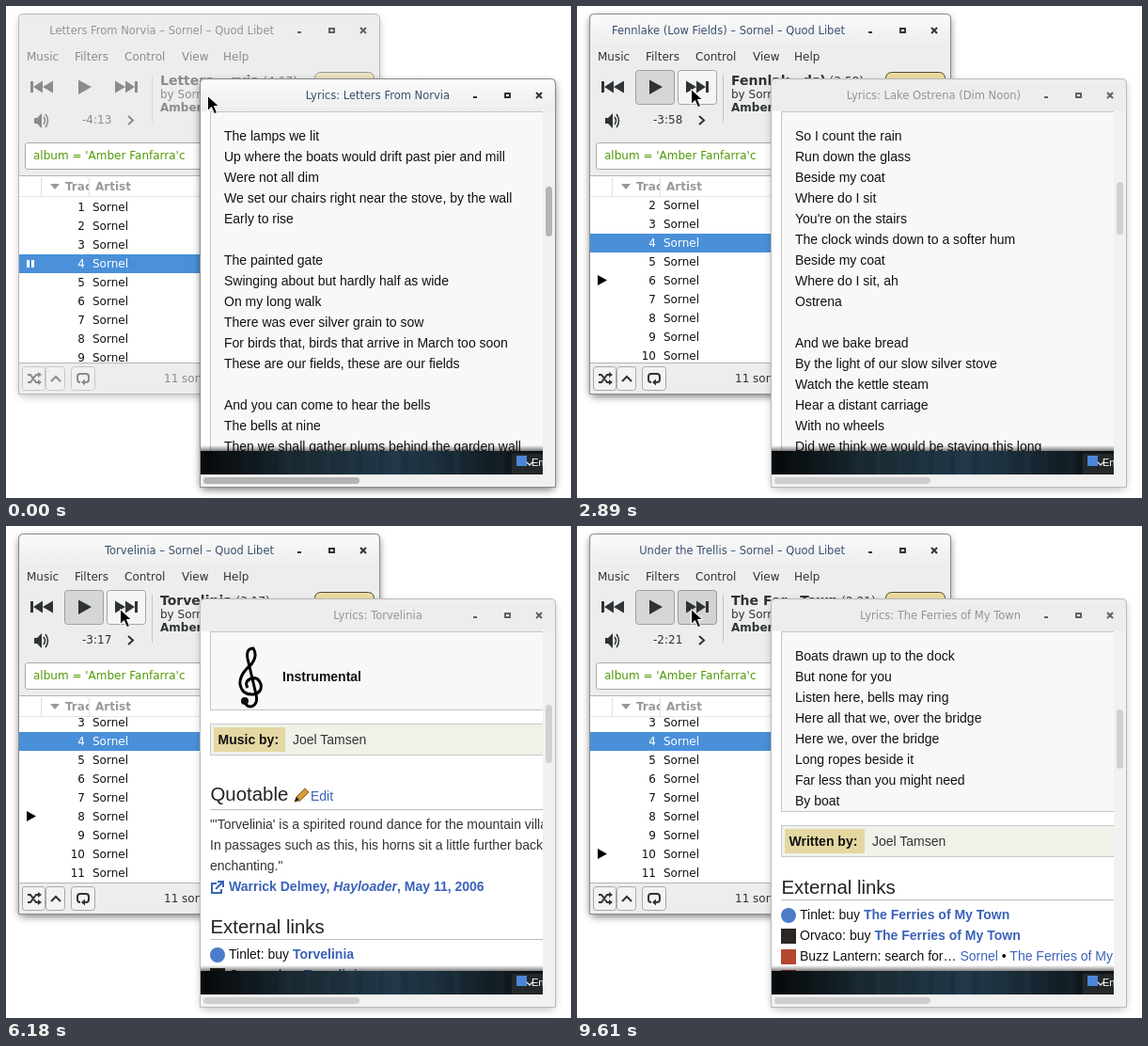
An HTML page that plays this animation: 601 by 523 pixels, repeating every 9.71 s.

```html
<!DOCTYPE html>
<html lang="en">
<head>
<meta charset="utf-8">
<title>Lyrics window</title>
<style>
  html, body { margin: 0; width: 100%; height: 100%; overflow: hidden; background: #fff; }
  svg { display: block; width: 601px; height: 523px; }
  text { white-space: pre; }
  .ui { font: 12px "DejaVu Sans", sans-serif; fill: #2e3436; }
  .page { font: 14px "Liberation Sans", Arial, sans-serif; fill: #111; }
  .title { font-size: 11.5px; }
  .b { font-weight: bold; }
  .big { font-size: 14px; font-weight: bold; }
  .link { fill: #3a62b8; }
  .head { font-size: 20.4px; fill: #222; }
  .small { font-size: 12px; }
</style>
</head>
<body>
<svg id="stage" viewBox="0 0 601 523"></svg>
<script>
const LOOP = 9710;
const ARTIST = 'Sornel', ALBUM = 'Amber Fanfarra', WRITER = 'Joel Tamsen';

// at: press, window title, player, lyrics title, page, end of the bar slide
const SONGS = [
  { name: 'Letters From Norvia', short: 'Letters …rvia', len: '4:17', left: '4:13', scroll: 0, thumb: [192, 245],
    at: [0, 0, 0, 0, 0, 0],
    lines: ['The lamps we lit', 'Up where the boats would drift past pier and mill', 'Were not all dim',
      'We set our chairs right near the stove, by the wall', 'Early to rise', '', 'The painted gate',
      'Swinging about but hardly half as wide', 'On my long walk', 'There was ever silver grain to sow',
      'For birds that, birds that arrive in March too soon', 'These are our fields, these are our fields', '',
      'And you can come to hear the bells', 'The bells at nine', 'Then we shall gather plums behind the garden wall', ''] },
  { name: 'Lake Ostrena (Dim Noon)', short: 'Lake Os…on)', len: '3:15', scroll: 2, thumb: [187, 243],
    at: [1330, 1410, 1450, 1490, 1870, 2310], slide: [[150, 490], [110, 481], [70, 477]], app: 'Quod Li…',
    lines: ['So I count the rain', 'Run down the glass', 'Beside my coat', 'Where do I sit', "You're on the stairs",
      'The clock winds down to a softer hum', 'Beside my coat', 'Where do I sit, ah', 'Ostrena', '',
      'And we bake bread', 'By the light of our slow silver stove', 'Watch the kettle steam',
      'Hear a distant carriage', 'With no wheels', 'Did we think we would be staying this long', ''] },
  { name: 'Fennlake (Low Fields)', short: 'Fennlak…ds)', len: '3:58', scroll: 22, thumb: [198, 263],
    at: [2570, 2680, 2860, 3060, 3210, 3500], slide: [[150, 493], [110, 484]],
    lines: ['Calm, calm is all there on the moor', 'Yes, and I stay, and I stay', 'I could find my own way home',
      "Yes and there's my own way, way home"] },
  { name: 'Cobalt Acres', len: '2:08', scroll: 42, thumb: [192, 253], early: [4390, 198, 272],
    at: [3930, 4000, 4060, 4130, 4540, 4820], slide: [[140, 493], [100, 483]],
    lines: ["The kettle's on", "The kettle's off", 'When morning comes too soon', 'I curl up like a sleepy cat',
      'Counting the tiles along the roof', '', 'When I wake up', 'I plan to build a little boat',
      'A cobalt field, where the bees are at ease', 'Hum along now, hum along'] },
  { name: 'Torvelinia', len: '3:17', scroll: 45, thumb: [190, 252], early: [5790, 192, 270],
    at: [5260, 5350, 5440, 5530, 5930, 6180], slide: [[140, 493], [100, 482]], quote: true },
  { name: 'The Quarry', len: '3:12', scroll: 45, thumb: [197, 267], bare: true,
    at: [6670, 6750, 6810, 6870, 7230, 7640], slide: [[150, 493], [110, 483], [60, 477]] },
  { name: 'The Ferries of My Town', short: 'The Fer…Town', len: '2:21', scroll: 45, thumb: [195, 258],
    at: [8020, 8090, 8170, 8350, 8590, 9000], slide: [[150, 492], [110, 483], [60, 477]],
    lines: ['Boats drawn up to the dock', 'But none for you', 'Listen here, bells may ring',
      'Here all that we, over the bridge', 'Here we, over the bridge', 'Long ropes beside it',
      'Far less than you might need', 'By boat'] },
  { name: 'Under the Trellis', at: [9480, 9610, 1e5, 1e5, 1e5, 1e5] }
];

// name, colour, round mark, kind of link
const SITES = [
  ['Tinlet', '#4a7cc9', 1, 'buy'], ['Orvaco', '#2b2722', 0, 'buy'], ['Buzz Lantern', '#b5482f', 0, 'find'],
  ['Noma.xy', '#c5362c', 0, 'album'], ['Calinda', '#7fb0dc', 0, 'find'], ['Omniledge', '#444', 0, 'album'],
  ['Wavelia', '#6b7a24', 1, ''], ['onlysong', '#3d8fd0', 1, ''], ['TuneLedgers', '#1c2350', 0, '']
];

const rect = (x, y, w, h, fill, more = '') =>
  `<rect x="${x}" y="${y}" width="${w}" height="${h}" fill="${fill}" ${more}/>`;
const box = (x, y, w, h, fill, line, r = 0) =>
  rect(x + .5, y + .5, w - 1, h - 1, fill, `stroke="${line}" rx="${r}"`);
const path = (d, fill = '#2e3436', more = '') => `<path d="${d}" fill="${fill}" ${more}/>`;
const line = (d, width = 2, color = '#2e3436') => path(d, 'none', `stroke="${color}" stroke-width="${width}"`);
const text = (x, y, s, cls = '', more = '') => `<text x="${x}" y="${y}" class="${cls}" ${more}>${s}</text>`;
const span = (s, cls) => `<tspan class="${cls}">${s}</tspan>`;

const heading = (y, s, gap = 6) =>
  text(217.5, y, s, 'head') + rect(217, y + gap, 354, 1, '#bbb');

function links(song, y) {
  const join = list => list.map(s => span(s, 'link')).join(' • ');
  return SITES.map(([site, color, round, kind], i) => {
    const by = y + 22 * i;
    if (song.bare && (kind === 'album' || site === 'Orvaco')) kind = 'find';
    const names = kind === 'album' ? [ARTIST, ALBUM, song.name] : [ARTIST, song.name];
    const body = kind === 'find' || kind === 'album'
      ? 'search for… ' + join(names)
      : (kind && kind + ' ') + span(song.name, 'b link');
    return rect(217, by - 12, 16, 16, color, round ? 'rx="8"' : '') + text(237, by, `${site}: ${body}`);
  }).join('');
}

function credit(y, label, w) {
  return box(217, y, 400, 34, '#f0f2ea', '#c9c9c9') + rect(221, y + 4, w, 26, '#e4d8a2') +
    text(225.5, y + 22, label, 'b') + text(221 + w + 8, y + 22, WRITER, '', 'fill="#333"');
}

const CLEF = 'M254 188q4 6 9 3q5-3 3-12L257 141q-2-11 6-11q5 8-2 17q-13 11-12 21q2 12 14 11q10-2 8-11q-3-8-10-6q-8 3-4 10';

function page(song) {
  const n = song.lines ? song.lines.length : 0;
  const end = n ? 128 + 22 * n : 196;
  let s = box(217, 112, 400, end - 112, '#f8f8f8', '#c4c4c4');
  if (n) s += song.lines.map((l, i) => text(232, 143 + 22 * i, l)).join('');
  else s += line(CLEF, 3, '#000') + '<circle cx="254" cy="186" r="4"/>' + text(294, 165, 'Instrumental', 'b');
  if (!song.bare) s += credit(end + 14, n ? 'Written by:' : 'Music by:', n ? 85 : 76);
  let y = end + (song.bare ? 39 : 87);
  if (song.quote) {
    s += heading(292, 'Quotable', 9) +
      path('M307 293l2-5 9-9 4 4-9 9z', '#d99a3c', 'stroke="#6b4a1c" stroke-width=".8"') +
      path('M307 293l2-5 3 3z', '#222') + text(324, 292, 'Edit', 'link') +
      ['"\'' + song.name + '\' is a spirited round dance for the mountain villages',
        'In passages such as this, his horns sit a little further back',
        'enchanting."'].map((l, i) => text(217, 322 + 22 * i, l, '', 'fill="#333"')).join('') +
      line('M224 380h-5v10h10v-4', 2, '#3a62b8') + line('M223 386l7-7M225 378h6v6', 2, '#3a62b8') +
      text(237, 388, 'Warrick Delmey, <tspan font-style="italic">Hayloader</tspan>, May 11, 2006', 'b link');
    y = 433;
  }
  s += heading(y, 'External links') + links(song, y + 27);
  if (song.bare) s += box(217, 454, 400, 60, '#fff', '#bbb') +
    text(238, 479, 'Categories: Song | Songs by ' + ARTIST + ' | Green Songs | Songs T', 'small link');
  return s;
}

function shadow(id, x, y, w, h) {
  return rect(x, y + 3, w, h, '#000', `id="${id}" rx="5" filter="url(#soft)"`);
}

function frame(x, y, w, h, id) {
  const d = `M${x + .5} ${y + h - .5}v${6 - h}q0-5 5-5h${w - 11}q5 0 5 5v${h - 6}z`;
  return path(d, '#ededed', 'stroke="#b9b9b9"') +
    `<g id="${id}">${path(d, 'none', 'stroke="#8c8c8c"')}${rect(x + 2, y + 1, w - 4, 33, 'url(#bar)', 'rx="4"')}</g>`;
}

const controls = (x, y, id) => `<g id="${id}">` + rect(x - 2, y + 1, 4, 2, '#2e3436') +
  path(`M${x + 31} ${y - 3}h7v6h-7zm2 2v2h3v-2z`, '#2e3436', 'fill-rule="evenodd"') +
  line(`M${x + 65} ${y - 3}l6 6m0-6l-6 6`) + '</g>';

const rows = Array.from({ length: 11 }, (_, i) => {
  const y = 218 + 20 * i, color = i === 3 ? '#fff' : '#111';
  return (i === 3 ? rect(14, y - 14, 383, 20, '#4a90d9') : '') +
    text(84, y, i + 1, '', `text-anchor="end" style="fill:${color}"`) +
    text(92, y, ARTIST, '', `style="fill:${color}"`);
}).join('');

const menu = [['Music', 22], ['Filters', 73], ['Control', 126], ['View', 187], ['Help', 231]]
  .map(([s, x]) => text(x, 58, s)).join('');

const streaks = Array.from({ length: 30 }, (_, i) =>
  rect(207 + i * 11.2, 0, 5 + 4 * Math.sin(i * 5), 25, i % 2 ? '#000' : '#3a5a70',
    `opacity="${(.06 + .05 * Math.sin(i * 2.7)).toFixed(2)}"`)).join('');

const stops = ['#05080a', '#10191e', '#1a2a33', '#1d303c', '#22394a', '#1a2c38', '#121d24', '#0c1114']
  .map((c, i) => `<stop offset="${i / 7}" stop-color="${c}"/>`).join('');

const stage = document.getElementById('stage');
stage.innerHTML = `
<defs>
  <filter id="soft" x="-10%" y="-10%" width="120%" height="120%"><feGaussianBlur stdDeviation="4"/></filter>
  <linearGradient id="bar" x2="0" y2="1"><stop stop-color="#fbfbfb"/><stop offset="1" stop-color="#ededed"/></linearGradient>
  <linearGradient id="night">${stops}</linearGradient>
  <linearGradient id="fade" x2="0" y2="1"><stop stop-color="#000" stop-opacity="0"/><stop offset="1" stop-color="#000" stop-opacity=".5"/></linearGradient>
  <clipPath id="listClip"><rect x="14" y="203" width="383" height="176"/></clipPath>
  <clipPath id="trackClip"><rect x="60" y="182" width="28" height="20"/></clipPath>
  <clipPath id="pageClip"><rect x="207" y="112" width="364" height="386"/></clipPath>
</defs>
${rect(0, 0, 601, 523, '#fff')}
<g class="ui">
  ${shadow('mainShade', 14, 9, 383, 403)}
  ${frame(13, 8, 385, 405, 'mainGlow')}
  ${text(285, 30, '', 'title', 'id="mainTitle" text-anchor="end"')}
  ${controls(312, 26, 'mainCtl')}
  <g id="mainInk">
    ${menu}
    <g id="buttons">${box(62, 68, 42, 37, '#d6d6d6', '#a0a0a0', 3)}
      <g id="hover">${box(107, 68, 42, 37, '#f5f5f5', '#a4a4a4', 3)}</g>
      <g id="press">${box(107, 68, 42, 37, '#d3d3d3', '#989898', 3)}</g></g>
    ${path('M26 80h3v12h-3zM39 79.500v13l-10-6.500zM50 79.500v13l-11-6.500z')}
    ${path('M77 78.500l14 7.500-14 8z')}
    ${path('M116 79.500v13l11-6.500zM127 79.500v13l10-6.500zM137 80h3v12h-3z')}
    ${path('M30 119h3l5-5v16l-5-5h-3z')}
    ${line('M40 118q3 4 0 8M42 115q5 7 0 14', 1.5)}
    ${text(81, 125, '', '', 'id="clock"')}
    ${line('M130 117l5 4.500-5 4.500')}
    ${rect(155, 73, 1, 51, '#c4c4c4')}
    <text x="164" y="84"><tspan id="song" class="big"></tspan> <tspan id="len"></tspan></text>
    ${text(164, 98, 'by ' + ARTIST)}
    ${text(164, 112, ALBUM, 'b')}
    ${box(328, 70, 64, 40, '#ecdca0', '#4a4a3a', 6)}
  </g>
  ${box(20, 145, 370, 29, '#fff', '#a3ab9d', 3)}
  ${text(29, 163, `album = '${ALBUM}'c`, '', 'style="fill:#4e9a06"')}
  ${rect(14, 180, 383, 200, '#b4b4b4')}${rect(14, 181, 383, 198, '#fff')}
  ${rect(37, 182, 1, 20, '#e0e0e0')}${rect(88, 182, 1, 20, '#e0e0e0')}${rect(14, 202, 383, 1, '#e6e6e6')}
  ${path('M47 189h10l-5 6z', '#999')}
  ${text(63, 196, 'Track', 'b', 'style="fill:#999" clip-path="url(#trackClip)"')}
  ${text(95, 196, 'Artist', 'b', 'style="fill:#999"')}
  <g clip-path="url(#listClip)"><g id="rows">${rows}
    <g id="paused">${rect(22, 270, 3, 8, '#fff')}${rect(27, 270, 3, 8, '#fff')}</g>
    <g id="playing">${path('M22 268v11l10-5.500z', '#000')}</g></g></g>
  <g id="footInk">
    ${box(17, 383, 25, 26, '#f3f3f3', '#a8a8a8', 3)}${box(42, 383, 21, 26, '#f3f3f3', '#a8a8a8', 3)}${box(69, 383, 26, 26, '#f3f3f3', '#a8a8a8', 3)}
    ${line('M23 392h3l6 8h3M23 400h3l6-8h3')}${path('M34 389l4 3-4 3zM34 397l4 3-4 3z')}
    ${line('M48 399l5-5 5 5')}
    ${line('M79 400q-3 0-3-3v-3q0-3 3-3h6q3 0 3 3v3q0 3-3 3h-2')}${path('M84 396.500v7l-4-3.500z')}
    ${text(168, 400, '11 songs')}
  </g>
  ${shadow('lyrShade', 207, 78, 377, 433)}
  ${frame(206, 77, 379, 435, 'lyrGlow')}
  ${text(395.5, 99, '', 'title', 'id="lyrTitle" text-anchor="middle"')}
  ${controls(499, 95, 'lyrCtl')}
</g>
<g class="page" clip-path="url(#pageClip)">
  ${rect(207, 112, 364, 386, '#fff')}
  ${SONGS.slice(0, 7).map(s => `<g class="sheet">${page(s)}</g>`).join('')}
  <g id="strip">${rect(207, -6, 364, 6, 'url(#fade)')}${rect(207, 0, 364, 25, 'url(#night)')}${streaks}
    ${rect(538, 3, 33, 22, '#23282b')}${rect(543, 5, 11, 11, '#4a86d8')}
    ${line('M554 12l3 3 3-3', 1.5, '#ddd')}
    ${text(559, 16, 'En', '', 'style="font-size:11px;fill:#fff"')}</g>
</g>
${rect(207, 498, 377, 13, '#f1f1f1')}${rect(571, 112, 13, 386, '#f1f1f1')}
<g id="bars">${rect(210, 501, 166, 7, '#b4b4b4', 'rx="3.5"')}${rect(574, 192, 7, 53, '#b4b4b4', 'rx="3.5" id="thumb"')}</g>
<g id="cursor">${path('M0 0v16l4-4 3 7 3-1-3-7h5z', '#000', 'stroke="#fff"')}</g>`;

const el = id => document.getElementById(id);
const sheets = [...document.querySelectorAll('.sheet')];
const latest = (k, t) => SONGS.findLastIndex(s => s.at[k] <= t);
const show = (node, on) => { node.style.display = on ? '' : 'none'; };
const put = (id, s) => { const e = el(id); if (e.textContent !== s) e.textContent = s; return e; };
const fade = (id, v) => el(id).setAttribute('opacity', v);
const move = (id, x, y) => el(id).setAttribute('transform', `translate(${x} ${y})`);
const tint = (id, v) => { el(id).style.fill = `color-mix(in srgb, #37506e ${v * 100}%, #949494)`; };

// held steps between a and b, as a share from 0 to 1
const steps = (t, a, b, n) =>
  Math.max(0, Math.min(n, 1 + Math.floor((t - a) / (b - a) * (n - 1) + 1e-6))) / n;

function stripY(t, song) {
  const end = song.at[5];
  if (t >= end) return 473;
  let y = 498;
  for (const [before, at] of song.slide) if (t >= end - before) y = at;
  return y;
}

// moves the active look from one window to the other
function setFocus(main) {
  for (const [id, v] of [['main', main], ['lyr', 1 - main]]) {
    tint(id + 'Title', v);
    fade(id + 'Ctl', .75 + .25 * v);
    fade(id + 'Glow', v);
    fade(id + 'Shade', .25 + .3 * v);
  }
  fade('mainInk', .52 + .48 * main);
  fade('footInk', .52 + .48 * main);
  fade('bars', 1 - .45 * main);
}

function draw(t) {
  const [press, title, main, lyr, sheet] = [0, 1, 2, 3, 4].map(k => latest(k, t));
  const now = SONGS[main], shown = SONGS[sheet];
  setFocus(steps(t, 1330, 1490, 5));

  put('mainTitle', `${SONGS[title].name} – ${ARTIST} – ${SONGS[title].app || 'Quod Libet'}`);
  put('song', now.short || now.name);
  put('len', `(${now.len})`);
  put('clock', '-' + (now.left || now.len));
  const cap = put('lyrTitle', 'Lyrics: ' + SONGS[lyr].name);
  cap.setAttribute('x', Math.min(395.5, 472 - cap.getComputedTextLength() / 2));

  show(el('buttons'), press > 0);
  show(el('hover'), press === main);
  show(el('press'), press !== main);
  move('rows', 0, -now.scroll);
  show(el('paused'), main === 0);
  show(el('playing'), main > 0);
  move('playing', 0, 20 * main);

  sheets.forEach((s, i) => show(s, i === sheet));
  move('strip', 0, stripY(t, shown));
  const next = SONGS[sheet + 1];
  const [top, bottom] = next.early && t >= next.early[0] ? next.early.slice(1) : shown.thumb;
  el('thumb').setAttribute('y', top);
  el('thumb').setAttribute('height', bottom - top);

  const a = steps(t, 50, 130, 3), b = steps(t, 480, 660, 5);
  move('cursor', Math.round(214 - 73 * a - 20 * b) + .5, Math.round(95 - 8 * a + b) + .5);
}

const start = performance.now();
function tick() {
  draw((performance.now() - start) % LOOP);
  requestAnimationFrame(tick);
}
tick();
</script>
</body>
</html>
```
